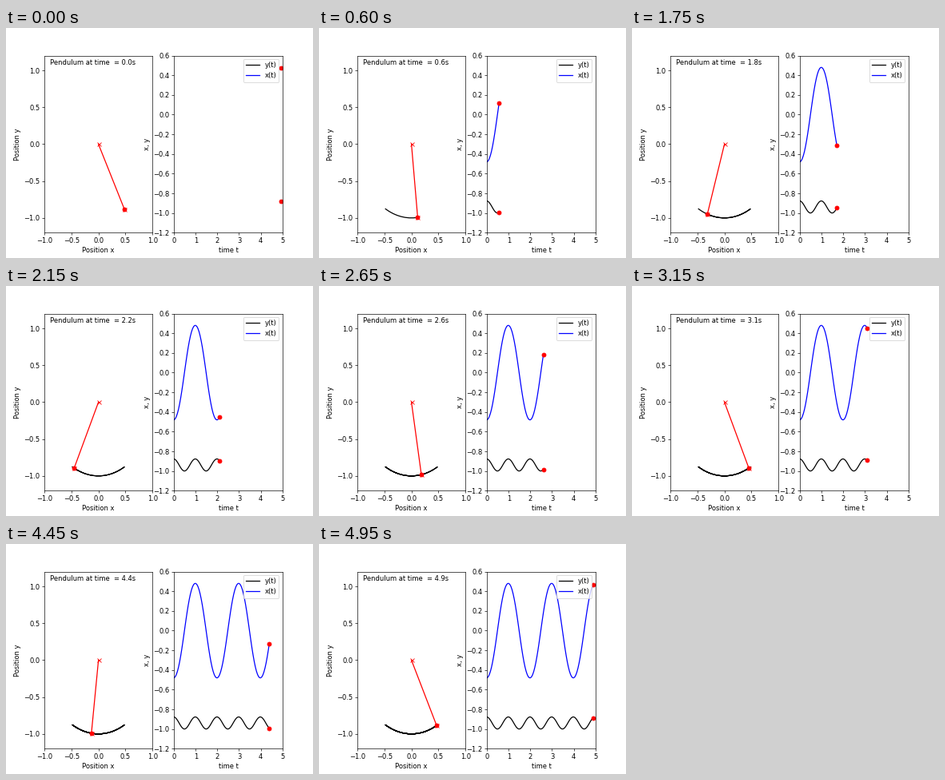
A matplotlib script that plays this animation: 384x288 px, repeating every 5000 ms.

```python
import numpy as np
import matplotlib.pyplot as plt
from matplotlib.animation import FuncAnimation

G, LENGTH = 9.81, 1.0
DT, STEPS = 0.05, 100


def swing(theta, omega=0.0):
    """Small-angle pendulum, integrated with the semi-implicit Euler method."""
    t = 0.0
    rows = []
    for _ in range(STEPS):
        rows.append((t, LENGTH * np.sin(theta), -LENGTH * np.cos(theta)))
        omega -= G / LENGTH * theta * DT
        theta += omega * DT
        t += DT
    return np.array(rows).T


t, x, y = swing(-0.5)

fig, (ax_pos, ax_time) = plt.subplots(1, 2, figsize=(6.4, 4.8), dpi=60)

ax_pos.set(xlim=(-1, 1), ylim=(-1.2, 1.2),
           xlabel="Position x", ylabel="Position y")
trail, = ax_pos.plot([], [], "k-")
rod, = ax_pos.plot([], [], "r-x")
bob, = ax_pos.plot([], [], "ro")
label = ax_pos.text(0.05, 0.95, "", transform=ax_pos.transAxes)

ax_time.set(xlim=(0, 5), ylim=(-1.2, 0.6), xlabel="time t", ylabel="x, y")
y_line, = ax_time.plot([], [], "k-", label="y(t)")
x_line, = ax_time.plot([], [], "b-", label="x(t)")
y_dot, = ax_time.plot([], [], "ro")
x_dot, = ax_time.plot([], [], "ro")
ax_time.legend(loc="upper right")


def update(i):
    # The head trails the clock by one step, so it wraps to the end at i = 0.
    head = i - 1
    trail.set_data(x[:i], y[:i])
    rod.set_data([0, x[head]], [0, y[head]])
    bob.set_data([x[head]], [y[head]])
    label.set_text(f"Pendulum at time  = {t[i]:.1f}s")
    for line, dot, values in ((x_line, x_dot, x), (y_line, y_dot, y)):
        line.set_data(t[:i], values[:i])
        dot.set_data([t[head]], [values[head]])
    return trail, rod, bob, label, x_line, y_line, x_dot, y_dot


anim = FuncAnimation(fig, update, frames=STEPS, interval=50,
                     init_func=lambda: update(0), blit=False, repeat=True)
plt.show()
```
